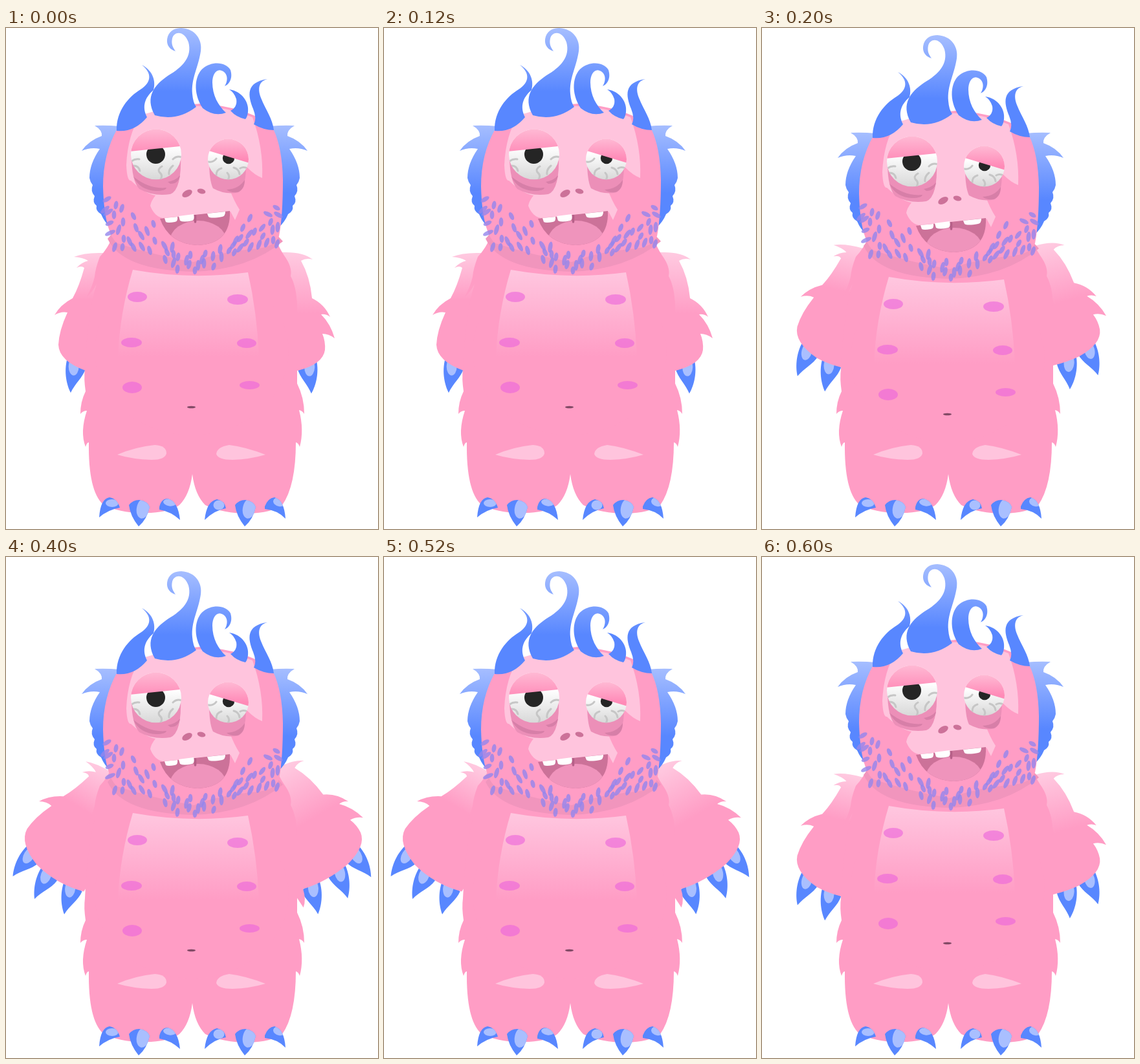
Recreate the animation shown at these times as an HTML page with a canvas. Size 575x775 px, loop 0.8 s.

```html
<!DOCTYPE html>
<html lang="en">
<head>
<meta charset="utf-8">
<title>Shrugging monster</title>
<style>
html, body { margin: 0; width: 100%; height: 100%; overflow: hidden; background: #fff; }
canvas { display: block; width: 575px; height: 775px; }
</style>
</head>
<body>
<canvas id="stage"></canvas>
<script>
const W = 575, H = 775, STEP = 200;
const PINK = '#ff9dc5', LIGHT = '#ffc4dd', BLUE = '#5887ff', PALE = '#a9bfff', ROSE = '#cc7299';
const canvas = document.getElementById('stage');
const ctx = canvas.getContext('2d');
const dpr = window.devicePixelRatio || 1;
canvas.width = W * dpr;
canvas.height = H * dpr;

const shape = (d, color) => { ctx.fillStyle = color; ctx.fill(new Path2D(d)); };
const line = (d, color, width) => {
  ctx.strokeStyle = color;
  ctx.lineWidth = width;
  ctx.lineCap = 'round';
  ctx.stroke(new Path2D(d));
};
const oval = (x, y, rx, ry, color, deg = 0) => {
  ctx.fillStyle = color;
  ctx.beginPath();
  ctx.ellipse(x, y, rx, ry, deg * Math.PI / 180, 0, 7);
  ctx.fill();
};
const fade = (y0, y1, a, b) => {
  const g = ctx.createLinearGradient(0, y0, 0, y1);
  g.addColorStop(0, a);
  g.addColorStop(1, b);
  return g;
};
const layer = (draw) => { ctx.save(); draw(); ctx.restore(); };
const turn = (deg) => ctx.rotate(deg * Math.PI / 180);

// ---- arms ----
function claw(x, y, deg, side) {
  layer(() => {
    ctx.translate(x, y);
    ctx.scale(side, 1);
    turn(deg);
    const d = 'M-15 -9C-17 15 -7 34 0 43C4 27 14 17 16 1Z';
    shape(d, BLUE);
    ctx.clip(new Path2D(d));
    oval(-3, 2, 8, 14, PALE, -10);
  });
}

const ARMS = [
  {
    pivot: [182, 368], side: 1, turns: [0, 14, 31], shift: [0, 0, 0], glow: [350, 420],
    claws: [[108, 522, 10.8], [146, 534, -1], [188, 532, -14]],
    path: 'M170 342Q160 348 150 348Q122 347 105 354Q119 355 127 360Q116 363 109 371Q117 367 121 371' +
      'Q113 400 103 418Q84 428 75 444Q85 438 95 440Q82 468 81 490Q82 515 123 530Q164 540 206 528L210 400Z'
  },
  {
    pivot: [389, 361], side: -1, turns: [0, -15, -30.5], shift: [0, -2.7, 0], glow: [350, 442],
    claws: [[466, 523, 8], [431, 533, -9], [384, 532, -16]],
    path: 'M400 340Q415 348 428 347Q459 346 474 358Q464 355 456 360Q470 385 473 418Q492 427 501 447' +
      'Q495 442 487 443Q502 458 508 480Q499 473 489 473Q494 485 493 498Q490 520 451 530' +
      'Q410 537 372 528Q368 545 358 553L350 400Z'
  }
];

function arm(a, pose) {
  layer(() => {
    const [x, y] = a.pivot;
    ctx.translate(x + a.shift[pose], y);
    turn(a.turns[pose]);
    ctx.translate(-x, -y);
    for (const [cx, cy, deg] of a.claws) claw(cx, cy, deg, a.side);
    shape(a.path, fade(a.glow[0], a.glow[1], '#ffc9e0', PINK));
  });
}

// ---- body ----
function body(drop) {
  shape('M165 322Q158 340 145 354Q138 372 137 385Q133 402 124 417Q134 408 140 396Q126 440 122 528' +
    'Q120 542 123 562Q115 578 115 597Q119 592 125 592Q114 625 123 648Q125 641 128 641Q127 716 150 737' +
    'Q175 750 210 750Q250 751 268 738Q284 722 288 690Q292 722 308 738Q335 751 375 751Q410 750 427 738' +
    'Q448 708 448 641Q452 642 454 648Q461 622 453 591Q458 592 461 597Q461 572 450 550L450 430' +
    'Q449 400 440 384Q443 370 430 352Q422 340 415 322Z', PINK);

  shape('M172 660Q200 648 230 645Q248 646 248 658Q246 668 225 668Q195 667 172 660', LIGHT);
  shape('M401 660Q370 648 345 645Q326 648 325 659Q328 668 350 668Q378 667 401 660', LIGHT);

  layer(() => {
    ctx.translate(0, drop);
    oval(287, 500, 150, 130, PINK);
    shape('M196 374Q285 390 374 378Q388 440 391 508L173 508Q176 440 196 374', fade(376, 508, '#ffc6df', PINK));
    const spot = 'rgba(236,100,220,.62)';
    oval(203, 416, 15, 8, spot);
    oval(358, 420, 16, 8, spot);
    oval(194, 486.5, 16, 7.5, spot);
    oval(372, 487.5, 15, 7.5, spot);
    oval(195, 556, 15, 9, spot);
    oval(376.5, 552.5, 15.5, 6.5, spot);
    oval(286.5, 586.5, 6.5, 1.7, '#824a66');
  });
}

function toe(d, x, y, rx, ry, deg) {
  layer(() => {
    shape(d, BLUE);
    ctx.clip(new Path2D(d));
    oval(x, y, rx, ry, PALE, deg);
  });
}

function toes() {
  toe('M144 757Q146 728 160 726Q172 728 176 742Q158 745 144 757', 164, 735, 10, 6, 0);
  toe('M237 741Q240 728 250 728Q266 732 269 761Q255 748 237 745Z', 253, 734, 10, 5.5, 8);
  toe('M307 761Q310 732 326 729Q338 731 340 743Q322 746 307 761', 329, 738, 8.5, 7.5, 0);
  toe('M400 740Q405 727 415 726Q430 730 432 759Q420 746 400 744Z', 423, 733, 10, 7, 10);
  const mid = 'M190 738Q196 730 206 730Q219 732 222 741Q218 760 205 771Q192 755 190 738';
  toe(mid, 212, 743, 10, 16, 12);
  layer(() => { ctx.translate(164, 0); toe(mid, 212, 743, 10, 16, 12); });
}

// ---- head ----
function sideFur() {
  shape('M176 152Q155 150 137 151Q149 158 148 167Q128 174 117 190Q131 184 145 187Q129 210 129 232' +
    'Q130 238 134 243Q130 252 137 260Q133 270 140 275Q138 283 147 288Q152 300 161 308L190 240Z',
    fade(150, 255, '#a6beff', BLUE));
}

function eye(x, y, r, lid, pupil, veins) {
  layer(() => {
    ctx.beginPath();
    ctx.arc(x, y, r, 0, 7);
    ctx.clip();
    ctx.fillStyle = fade(y - r * .3, y + r, '#ffffff', '#d8d8d8');
    ctx.fillRect(x - r, y - r, 2 * r, 2 * r);
    line(veins, '#c6c6c6', 3);
    oval(...pupil, '#252525');
    shape(`M${x - r - 2} ${y - r - 2}h${2 * r + 4}V${lid[1]}L${x - r - 2} ${lid[0]}Z`,
      fade(y - r, y, '#ffb9d4', '#ff8ab7'));
  });
}

function face() {
  shape('M208 135Q188 165 186 212Q187 237 193 236Q214 256 231 259Q224 268 223 275Q229 291 242 294' +
    'L347 284L354 297L361 281Q352 267 346 250L372 215Q385 228 396 232Q398 185 381 138Q300 105 208 135', LIGHT);

  shape('M194 197Q194 236 206 249Q228 261 254 257Q272 250 270 195Z', '#ec8fb8');
  shape('M197 230Q222 250 248 247Q247 252 232 252Q207 251 197 230', '#d77fa8');
  shape('M250 238Q262 236 269 228Q267 241 254 241Z', '#d77fa8');
  shape('M314 205Q314 236 320 248Q340 259 360 254Q372 246 371 205Z', '#ec8fb8');
  shape('M341 250Q360 249 369 235Q369 250 358 254Q346 255 341 250', '#d77fa8');

  eye(232, 195.5, 39, [191, 182.5], [231.5, 195.5, 14.5, 14.5],
    'M194 206q6 -4 12 -3M207 221q-2 -8 -10 -8M239 234q4 -6 -2 -11q-3 -5 4 -9M272 200q-8 -3 -14 3M252 226q-1 -7 6 -13');
  eye(343.5, 203, 31.5, [189, 209], [344, 201, 9.2, 9.2],
    'M313 207q8 1 12 -5M325 228q0 -9 8 -11M343 235q4 -6 -1 -11M352 216q8 2 9 10M373 217q-6 -3 -11 0');

  oval(280, 256, 8.5, 5, ROSE, -30);
  oval(302, 252.5, 6.5, 3.8, ROSE, 15);

  const mouth = 'M238 295L346 283Q348 334 296 336Q252 334 238 295';
  layer(() => {
    shape(mouth, ROSE);
    ctx.clip(new Path2D(mouth));
    oval(297, 330, 44, 32, '#ef94bc');
    line('M292.5 290V300', '#b65f88', 3.5);
  });
  shape('M245 294L265 292Q266 299 261 300Q250 302 247 300Z', '#fff');
  shape('M267 291L290 288Q292 296 288 298Q274 301 269 298Z', '#fff');
  shape('M311 287L339 284Q339 291 334 292Q317 295 313 292Z', '#fff');
}

function hair() {
  const tint = fade(0, 98, '#a6beff', BLUE);
  [
    'M171 159C170 128 190 106 208 95C225 84 226 70 210 57C227 66 232 82 228 96C214 108 210 122 218 138Q198 162 171 159',
    'M230 135C214 106 230 88 250 74C274 60 288 44 282 22C276 4 260 4 257 16C255 25 258 30 262 36' +
      'C250 32 247 23 250 13C254 3 262 0 271 0C293 1 304 19 301 36C297 62 286 78 288 102Q289 115 294 122Q264 145 230 135',
    'M304 124C288 100 292 72 305 62C318 51 340 52 347 65C351 78 345 87 338 90C343 82 343 73 337 68' +
      'C327 60 319 70 319 84C319 104 328 120 340 131Q322 138 304 124',
    'M345 95C366 98 376 116 374 130Q373 138 370 141Q356 138 347 128Q358 122 356 110Q353 100 345 95',
    'M404 79C392 82 388 92 394 108C402 128 412 140 414 158Q398 158 383 149Q388 140 382 125C374 105 370 84 404 79'
  ].forEach((d) => shape(d, tint));
}

// Beard hairs as x, y pairs.
const BEARD = [
  156, 265, 153, 281, 170, 274, 179, 279, 158, 285, 167, 289, 160, 302, 161, 317, 181, 300, 197, 291, 174, 312,
  201, 309, 182, 326, 191, 330, 168, 339, 180, 339, 209, 321, 218, 314, 228, 303, 197, 339, 210, 338, 230, 329,
  222, 344, 245, 337, 249, 347, 246, 358, 257, 339, 259, 350, 266, 354, 259, 363, 265, 373, 285, 351, 279, 359,
  283, 366, 292, 375, 297, 367, 303, 358, 308, 349, 306, 364, 320, 353, 321, 369, 331, 342, 333, 354, 345, 344,
  351, 336, 355, 329, 353, 347, 362, 325, 362, 340, 366, 309, 377, 294, 376, 319, 371, 332, 384, 315, 378, 339,
  396, 309, 397, 322, 391, 335, 405, 288, 409, 300, 412, 312, 403, 332, 418, 278, 421, 289, 420, 308, 413, 328,
  419, 334
];

function beard() {
  for (let i = 0; i < BEARD.length; i += 2) {
    const x = BEARD[i], y = BEARD[i + 1];
    const wob = Math.sin(i * 2.3) * 9;
    let deg = x < 190 ? 8 : x < 253 ? -22 : x < 340 ? 8 : 28;
    if (x < 162) deg = 60;
    if (x > 403) deg = y < 300 ? -65 : 10;
    oval(x, y, 3.4, 7.4 + Math.sin(i) * 1.2, 'rgba(148,134,236,.8)', deg + wob);
  }
}

function head() {
  sideFur();
  layer(() => { ctx.translate(583, 0); ctx.scale(-1, 1); sideFur(); });
  shape('M157 326Q180 375 290 377Q375 374 428 330L400 300H180Z', '#f195bd');
  shape('M172 156Q150 195 150 245Q151 285 158 308Q163 326 172 333Q232 352 290 362Q330 346 390 341' +
    'Q415 338 422 322Q428 290 428 235Q427 185 413 156Q380 122 300 117Q225 122 172 156', PINK);
  face();
  beard();
  hair();
}

function draw(pose) {
  const drop = pose * 11;
  ctx.setTransform(dpr, 0, 0, dpr, 0, 0);
  ctx.fillStyle = '#fff';
  ctx.fillRect(0, 0, W, H);
  for (const a of ARMS) arm(a, pose);
  body(drop);
  toes();
  layer(() => { ctx.translate(0, drop); head(); });
}

const POSES = [0, 1, 2, 1];
const start = performance.now();
let shown = -1;
function tick() {
  const pose = POSES[Math.floor((performance.now() - start) / STEP) % POSES.length];
  if (pose !== shown) draw(shown = pose);
  requestAnimationFrame(tick);
}
tick();
</script>
</body>
</html>
```
